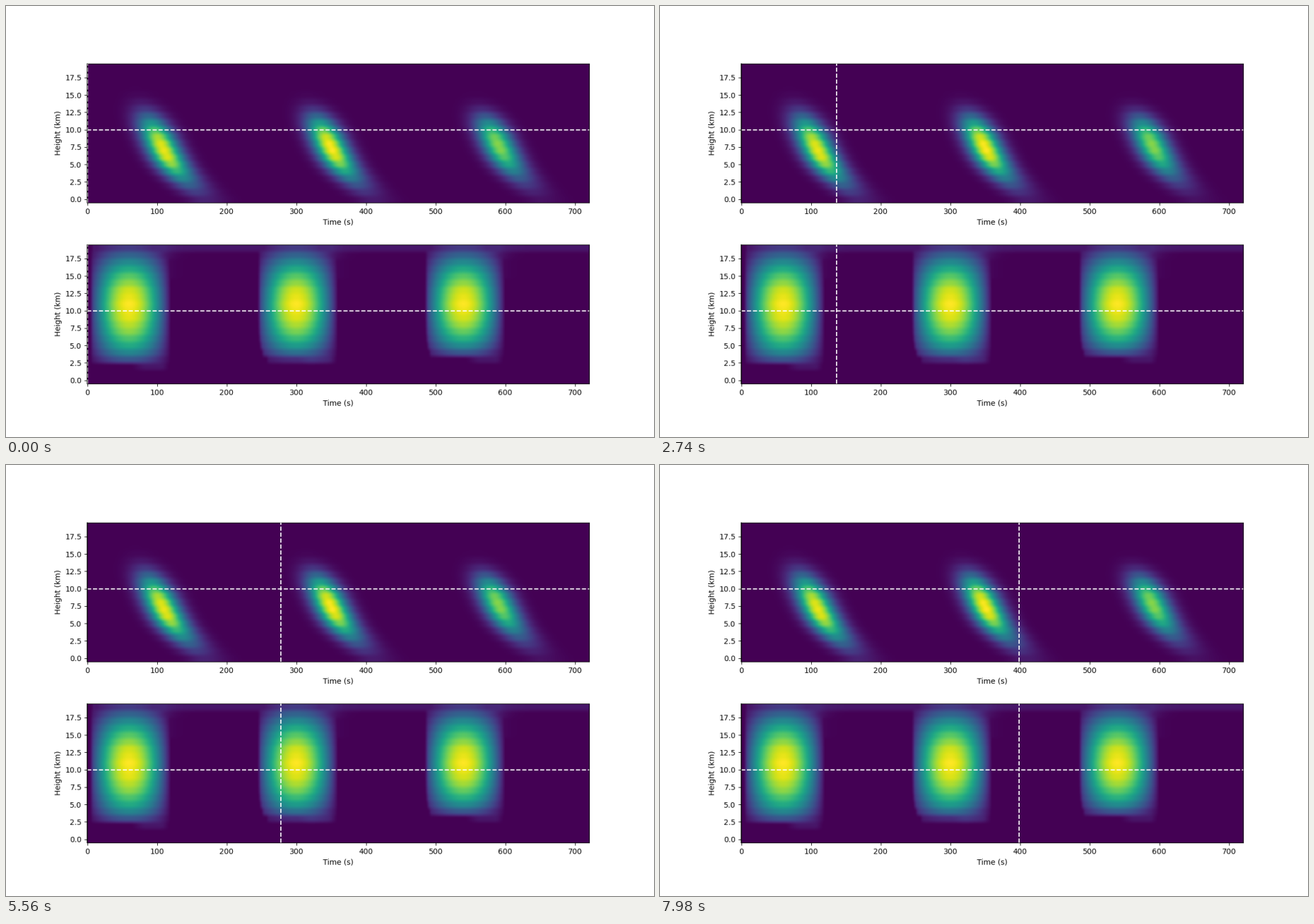
Write a matplotlib script that moves like this. It is 917 by 611 pixels and loops after 8000 ms.

```python
import matplotlib.pyplot as plt
import numpy as np
from matplotlib.animation import FuncAnimation
from matplotlib.lines import Line2D

STEPS, INTERVAL = 400, 20
WIDE, TALL = 1200, 800      # the plot is laid out at this size, then reduced
W, H = 917, 611
COLUMNS, PERIOD = 721, 240
t, h = np.meshgrid(np.arange(COLUMNS * 1.0), np.arange(20.0))
cycle = (t // PERIOD).astype(int)
phase = t % PERIOD


def smooth(x, lo, hi):
    u = np.clip((x - lo) / (hi - lo), 0, 1)
    return u * u * (3 - 2 * u)


def falling_field():
    """Three slanted plumes that sink and spread towards the ground."""
    field = np.zeros_like(t)
    for k, (top, peak) in enumerate([(6.7, 0.97), (7.1, 1.0), (7.5, 0.82)]):
        d = h - top
        up, down = np.maximum(d, 0), np.maximum(-d, 0)
        amp = peak * np.exp(-(up / (11.8 - top)) ** 2.8 - (down / 3.1) ** 2 / 2)
        low = np.maximum(7 - h, 0)
        dt = t - (k * PERIOD + 110 - 4.6 * (d - 0.3) + 0.5 * low ** 2)
        width = np.where(dt < 0, 16.5, 17 + 0.1 * low ** 2)
        field += amp * np.exp(-(dt / width) ** 2 / 2)
    return field


def pulsed_field():
    """Half-sine pulses in time; the lower side shrinks a little each cycle."""
    level = np.where(h < 12, 12 - (12 - h) * (1 + 0.06 * cycle), h)
    profile = np.interp(
        level,
        [2, 3, 4, 5, 7, 9, 11, 13, 15, 16, 17, 18, 19],
        [0, 0.27, 0.46, 0.61, 0.83, 0.96, 1, 0.93, 0.74, 0.61, 0.47, 0.32, 0.17])
    pulse = np.sin(np.pi * np.minimum(phase, 120) / 120)
    lag = np.where(cycle > 0, 3 + 12 * np.exp(-(h - 3) / 1.2), 2)
    field = profile * pulse * smooth(phase, lag, lag + 7)

    late = smooth(phase, 60, 85) * (1 - smooth(phase, 105, 120))
    field += np.where(h == np.where(cycle > 0, 3, 2), 0.06 * late, 0)

    tail = np.where(phase > 60, np.exp(-np.maximum(phase - 112, 0) / 12), 0)
    haze = np.select([h == 19, h == 18, h >= 15],
                     [0.06 + 0.05 * tail, 0.07 * tail, 0.03 * tail], 0.0)
    started = (cycle > 0) | (phase > 8)
    return np.maximum(field, haze * started)


def area_weights(n_in, n_out):
    """Share of each input cell inside each output cell."""
    edges = np.arange(n_out + 1) * n_in / n_out
    cells = np.arange(n_in)
    share = (np.minimum(edges[1:, None], cells + 1)
             - np.maximum(edges[:-1, None], cells))
    return np.clip(share, 0, 1) * n_out / n_in


def reduce_image(img):
    rows, cols = area_weights(img.shape[0], H), area_weights(img.shape[1], W)
    planes = [rows @ img[..., c] @ cols.T for c in range(3)]
    return np.clip(np.round(np.stack(planes, -1)), 0, 255).astype(np.uint8)


SIZE, DPI = (12.0066, 8), 76.375
fig, axes = plt.subplots(2, 1, figsize=SIZE, dpi=DPI)
for ax, field in zip(axes, (falling_field(), pulsed_field())):
    ax.imshow(field, origin="lower", aspect=10, cmap="viridis",
              vmin=0, vmax=1, interpolation="hanning")
    ax.axhline(10, color="white", ls="--")
    ax.set(xlabel="Time (s)", ylabel="Height (km)")

# Draw the static plot once at the layout size and keep it as a backdrop.
fig.set_dpi(100)
fig.set_size_inches(WIDE / 100, TALL / 100)
fig.canvas.draw()
backdrop = reduce_image(np.asarray(fig.canvas.buffer_rgba())[..., :3].astype(float))
boxes = [ax.get_position() for ax in axes]

fig.clear()
fig.set_dpi(DPI)
fig.set_size_inches(*SIZE)
fig.figimage(backdrop, zorder=-1)


def upright(x, box, **style):
    line = Line2D([x / WIDE] * 2, [box.y0, box.y1], snap=False,
                  transform=fig.transFigure, **style)
    return fig.add_artist(line)


left, step = boxes[0].x0 * WIDE, boxes[0].width * WIDE / COLUMNS
cursors = [upright(left, b, color="white", ls="--", lw=1.5, zorder=2) for b in boxes]
for b in boxes:
    upright(left + 0.5, b, color="black", lw=0.8, zorder=3)


def update(i):
    x = np.floor(left + (i + 0.5) * step + 0.5) / WIDE
    for cursor in cursors:
        cursor.set_xdata([x, x])
    return cursors


anim = FuncAnimation(fig, update, frames=STEPS, interval=INTERVAL, repeat=True)
plt.show()
```
